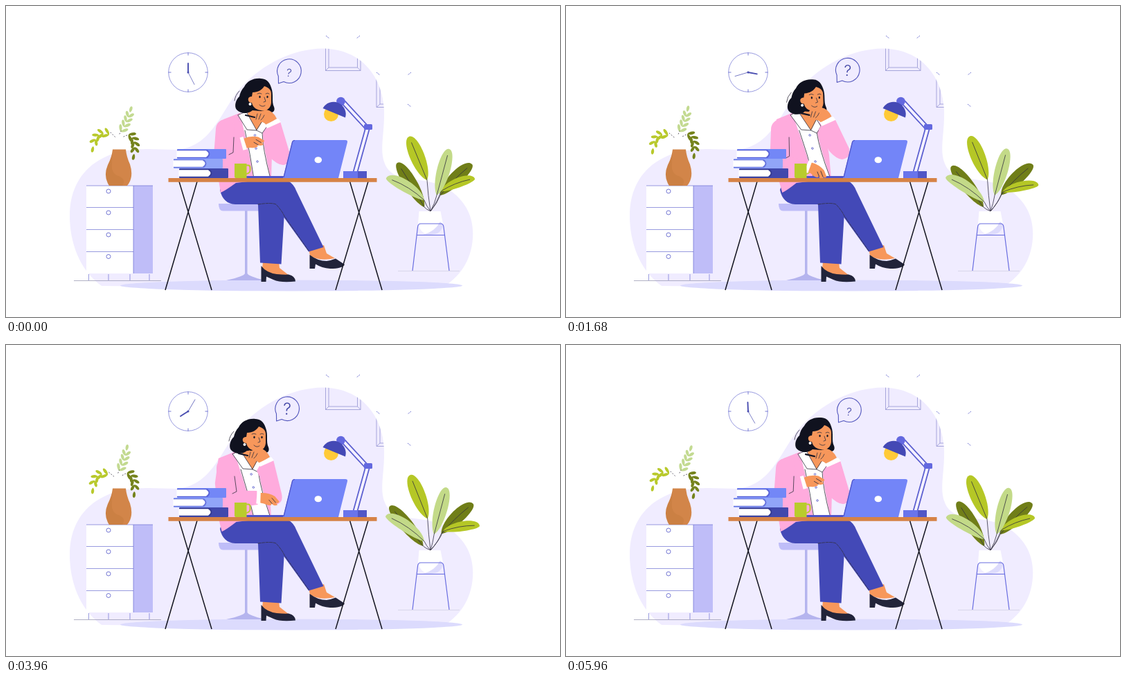
These frames come from a looping animation (800x450 px, 6 s). An HTML page:

```html
<!DOCTYPE html>
<html lang="en">
<head>
<meta charset="utf-8">
<title>Thinking at the desk</title>
<style>
  html, body { margin: 0; width: 100%; height: 100%; overflow: hidden; background: #fff; }
  svg { display: block; width: 100vw; height: 100vh; }
  .thin { fill: none; stroke: #6669cf; stroke-width: .9; }
  .ink { fill: none; stroke: #33303f; stroke-width: .8; stroke-linecap: round; }
  .skin { fill: #f7975b; }
  .pink { fill: #ffabdd; }
  .white { fill: #fff; }
  .pants { fill: #4349b7; }
  .shoe { fill: #22243a; }
  .lilac { fill: #bfbdf8; }
</style>
</head>
<body>
<svg viewBox="0 0 800 450" xmlns="http://www.w3.org/2000/svg">
  <defs>
    <path id="blobShape" d="M138 405C106 382 92 342 92 303C92 264 110 238 133 224C170 201 215 208 248 208C300 202 310 150 341 116C372 83 415 62 457 61.500C512 62 543 100 546 150C547 190 537 212 550 234C568 260 606 242 643 268C667 286 676 310 674 336C672 368 655 394 628 408L412 408Z"/>
    <clipPath id="blobClip"><use href="#blobShape"/></clipPath>
  </defs>

  <use href="#blobShape" fill="#f0ecff"/>
  <ellipse cx="412" cy="404.5" rx="247" ry="8" fill="#dcdbfd"/>

  <!-- wall frames -->
  <g class="thin" clip-path="url(#blobClip)" style="stroke:#9d9ed6">
    <path d="M461.500 42H512V93.500H461.500ZM466 47H507.500V89H466ZM461.500 93.500L466 89M512 93.500L507.500 89"/>
    <path d="M535 95H586V146.500H535ZM540 100H581V142H540ZM535 146.500L540 142"/>
  </g>
  <path class="thin" stroke-dasharray="2 1" d="M462 43l5 4M511 43l-5 4M535 96l5 4M585 96l-5 4M580 142l5 4"/>

  <!-- clock -->
  <circle class="thin" cx="263" cy="96" r="28.300" style="fill:#fff" stroke-opacity=".75"/>
  <path class="thin" d="M263 67.500v4M263 120.500v4M234.500 96h4M287.500 96h4"/>
  <g id="hands" stroke="#494db0" stroke-linecap="round">
    <path d="M263 96V83" stroke-width="1.900"/>
    <path d="M263 96L272 113.500" stroke-width=".7"/>
    <circle cx="263" cy="96" r="1.500" fill="#494db0" stroke="none"/>
  </g>

  <!-- speech bubble -->
  <g id="bubble">
    <path d="M393.300 101.500A17.300 17.300 0 1 1 401 109.500L393.500 112Z" fill="none" stroke="#5256bd" stroke-width="1.100" stroke-linejoin="round"/>
    <g id="question"><text y="5.600" text-anchor="middle" font-family="Inter, 'Open Sans', sans-serif" font-weight="300" font-size="15.500" fill="#4246a6">?</text></g>
  </g>

  <!-- cabinet -->
  <path class="white" d="M116 260H184V387H116Z"/>
  <path class="lilac" d="M184 260H212V387H184Z"/>
  <path class="thin" d="M116 260H212M116 291.500H184M116 323.500H184M116 355.500H184M184 260V387M119.500 388v9M148 388v9M179 388v9M207 388v9" opacity=".75"/>
  <g id="knobs" class="thin"></g>
  <path d="M98 397.500H224" stroke="#9c9cb4" stroke-width=".8"/>

  <!-- vase and sprigs -->
  <g id="sprigs"></g>
  <path d="M154 207.500H173Q174 218 179 229Q185 248 175 260H149Q140 246 147 230Q153 218 154 207.500Z" fill="#d28549"/>
  <path d="M154 210Q153 219 147 230Q140 246 149 260H168Q175 250 160 245Q151 240 153 227Z" fill="#b87335" opacity=".3"/>

  <!-- plant -->
  <g id="plant"></g>
  <path class="white" d="M596.500 297H627.500L631 315Q629 331 613 331Q599 331 595 315Z"/>
  <path d="M627 312L631 316Q629 331 613 331H602Q619 327 627 312Z" fill="#dddbfc"/>
  <path d="M587 383L594.500 320Q595 315 599 315H628Q631.500 315 632 320L640 383M593 331.500H634" fill="none" stroke="#686ce0" stroke-width="1.200"/>
  <path d="M566 383.500H655" stroke="#d3d2e4" stroke-width=".8"/>

  <!-- stool -->
  <path d="M345 296H348.500V387Q350 391 374 397H318Q344 391 345 387Z" fill="#b5b4ee"/>
  <path class="lilac" d="M307 286H365V296.500H313Q307 296 307 286Z"/>

  <!-- legs -->
  <path class="skin" d="M371 370H394L395 379L409 390Q388 395 370 380ZM437 352L459 346L463 358L475 365Q452 370 439 361Z"/>
  <path class="shoe" d="M368.500 376Q376 386 391 388Q402 389 408 388.500Q418 391 418 398.500Q397 401 386 396L376 391.500L375.500 399H368.500ZM438.500 360Q450 369 463 369Q470 368 476 365.500L489 374Q486 380 468 380Q456 379 447 373.500L446 380H438.500Z"/>
  <path class="pants" d="M310 263L336 252H405Q415 256 419 267L458.500 349L437 355.500L401.500 306L397.500 373.500L367 371.500L364 287H331Q313 286 309 266Z"/>
  <path class="ink" d="M364 287Q383 284 390 287Q399 297 402 304L437 354" stroke-dasharray="4 1.500"/>

  <!-- torso -->
  <g id="torso">
    <path class="pink" d="M337 155L314 164L306 200L307 252L310 270Q317 267 332 256L383 250L384 215L381 172L366 163Z"/>
    <path class="white" d="M338 156L371 164Q369 185 375 215L382 250H357.500Q352 216 346 190Z"/>
    <path class="ink" d="M345 180Q353 215 357.500 247M370 184Q371 208 381 246" stroke-width=".5"/>
    <path class="skin" d="M350 148H373V166L362 180L349 160Z"/>
    <path class="ink" d="M347 153L362 180L348 179L335 158ZM372 164L377 174L370 184L362 180Z" style="fill:#fff"/>
    <circle class="thin" cx="359.500" cy="187" r="1.300"/>
    <circle class="thin" cx="361" cy="206" r="1.300"/>
    <circle class="thin" cx="363" cy="225" r="1.300"/>
  </g>
  <path id="raisedArm" class="pink"/>

  <!-- head -->
  <g id="head">
    <path d="M368 105C357 104 348 109 344 117C340 121 338 126 337 131C332 135 329 145 333 150C339 156 349 157 356 151L379 153C386 156 389 151 387 146C383 138 387 128 383 118C380 108 374 105 368 105Z" fill="#10121f"/>
    <path class="ink" d="M337 123Q331 129 330 137"/>
    <path class="skin" d="M356 125C364 125 370 121 373 116C379 118 383 121 383 127V140C382 149 375 153 368 151C360 150 356 145 355 140C348 140 348 130 355 131Z"/>
    <path class="ink" d="M363 127q3-2 6 0M375 127q3-2 5 0M373 132l2 6l-3 1M366 143q4 4 8 1"/>
    <g id="eyes" fill="#191a28"><ellipse cx="366.500" cy="131.500" rx="1.200" ry="1.700"/><ellipse cx="377.500" cy="131.500" rx="1.200" ry="1.700"/></g>
    <circle class="white" cx="352.500" cy="142" r="2"/>
  </g>
  <g id="chinHand">
    <path class="skin" d="M357 159Q359 152 364 154L376 150Q386 152 391 163L376 172Q371 167 367 168L360 168Q356 164 357 159Z"/>
    <path class="ink" d="M363 156l-2 8M368 156l-3 8M373 158q-2 5-5 7" stroke-width=".5"/>
    <path d="M346 158L359 161" stroke="#171827" stroke-width="2.200" stroke-linecap="round"/>
    <path class="white" d="M374 172L393 163L397 168L377 177Z"/>
  </g>

  <!-- desk -->
  <path d="M276 254L230 411M250 254L297 411M496.500 254L543 411M523 254L476 411" stroke="#14151f" stroke-width="1.500"/>
  <path d="M346 246H404V249.500H346Z" fill="#4e53c9"/>
  <path id="sleeve" class="pink"/>
  <path id="fold" class="ink"/>
  <path d="M346 230.500H350Q352.500 230.500 352.500 234V238Q352 242.500 346 243" fill="none" stroke="#b9cc2c" stroke-width="2"/>
  <g id="typingHand">
    <path class="skin" d="M0-7Q12-9 22-4L29 3Q28 7 24 5L27 8Q23 11 18 7L18 9Q14 11 7 8L0 7Z"/>
    <path class="ink" d="M18-1l6 6M14 2l5 5" stroke-width=".5"/>
    <path class="white" d="M-4-10H1L2 9H-4Z"/>
  </g>
  <path d="M417 194H490Q493.500 194 493 197L480 249H400L413 197Q414 194 417 194Z" fill="#7385f8"/>
  <path d="M401 248L413.500 197Q414 194.500 417 194.500" fill="none" stroke="#4e53c9" stroke-width="1.200"/>
  <ellipse class="white" cx="450.800" cy="222.700" rx="5.300" ry="4.500"/>
  <g id="books"></g>
  <path d="M330 228H347.500V249H332Q330 249 330 247Z" fill="#b9cc2c"/>
  <path d="M234.500 249H535.500V254.800H234.500Z" fill="#d68246"/>

  <!-- lamp -->
  <g id="lampArm" fill="none">
    <path d="M504.500 240L522 177L487 139" stroke="#5a5ed0" stroke-width="7.500"/>
    <path d="M504.500 240L522 177L487 139" stroke="#f4f1ff" stroke-width="4"/>
  </g>
  <path d="M487 239H521V249H487Z" fill="#6974ec"/>
  <path d="M508 239H521V249H508Z" fill="#5156c6"/>
  <rect x="517" y="171" width="12" height="8" rx="1.500" fill="#6368df"/>
  <circle cx="483.500" cy="138" r="6.300" fill="#6368df"/>
  <circle cx="469.500" cy="156.500" r="10.500" fill="#ffca38"/>
  <path d="M457.500 148A17.700 17.700 0 0 1 490 161.500Z" fill="#4449b5"/>
</svg>

<script>
const LOOP = 6000, STEP = 40;
const $ = id => document.getElementById(id);
const set = (id, name, value) => $(id).setAttribute(name, value);
const mix = (a, b, k) => a + (b - a) * k;

// Poses of the sitter, joined by a smooth periodic curve.
const times = [0, 1080, 2320, 3160, 3960, 5000];
const pose = {
  headX: [0, -8, -13, -10, -8, -5],
  headY: [0, 1, 1.5, 1.5, 2, 1.5],
  headTurn: [0, -1, -2, -2, 0, 1],
  shoulderX: [317, 312, 309, 311, 318, 318],
  elbowX: [313, 309, 307, 309, 318, 318],
  elbowY: [224, 229, 229, 229, 224, 224],
  wristX: [344, 351, 350, 351, 366, 363],
  wristY: [199, 230, 231, 231, 221, 221],
  wristTurn: [-15, 22, 20, 20, 5, 30],
  cuffX: [0, -5, -10, -13, -10, -6],
  cuffY: [0, -2, -4, -3, -1, 1],
  raisedX: [411, 411, 407, 399, 399, 403],
  raisedY: [220, 214, 211, 216, 221, 214]
};

function key(i) {
  const n = times.length, wrap = Math.floor(i / n);
  return { i: i - wrap * n, time: times[i - wrap * n] + wrap * LOOP };
}

function sample(values, t) {
  let i = times.length - 1;
  while (times[i] > t) i--;
  const [a, b, c, d] = [i - 1, i, i + 1, i + 2].map(j => {
    const k = key(j);
    return { t: k.time, v: values[k.i] };
  });
  const span = c.t - b.t, u = (t - b.t) / span;
  const m0 = (c.v - a.v) / (c.t - a.t) * span;
  const m1 = (d.v - b.v) / (d.t - b.t) * span;
  return b.v + u * (m0 + u * (3 * (c.v - b.v) - 2 * m0 - m1 + u * (2 * (b.v - c.v) + m0 + m1)));
}

// Point along a base-to-tip line, moved sideways by off pixels.
function beside(x0, y0, x1, y1, along, off) {
  const dx = x1 - x0, dy = y1 - y0, k = off / Math.hypot(dx, dy);
  return `${(x0 + dx * along - dy * k).toFixed(2)} ${(y0 + dy * along + dx * k).toFixed(2)}`;
}

function leaf(x0, y0, x1, y1, width, bend = 0) {
  const at = (along, side) => beside(x0, y0, x1, y1, along, side * width / 1.5 + bend / .75);
  return `M${x0} ${y0}C${at(.2, 1)} ${at(1, 1)} ${x1} ${y1}C${at(1, -1)} ${at(.2, -1)} ${x0} ${y0}Z`;
}

function limb(x0, y0, x1, y1, r0, r1) {
  const len = Math.hypot(x1 - x0, y1 - y0), nx = -(y1 - y0) / len, ny = (x1 - x0) / len;
  return `M${x0 + nx * r0} ${y0 + ny * r0}A${r0} ${r0} 0 0 1 ${x0 - nx * r0} ${y0 - ny * r0}` +
    `L${x1 - nx * r1} ${y1 - ny * r1}L${x1 + nx * r1} ${y1 + ny * r1}Z`;
}

// Sprig: pairs of small leaves along a quadratic curve.
function sprig([ax, ay, bx, by, cx, cy], color) {
  let d = '';
  const count = 4;
  for (let i = 0; i <= count; i++) {
    const u = i / count, v = 1 - u;
    const x = v * v * ax + 2 * u * v * bx + u * u * cx;
    const y = v * v * ay + 2 * u * v * by + u * u * cy;
    const dir = Math.atan2(v * (by - ay) + u * (cy - by), v * (bx - ax) + u * (cx - bx));
    for (const side of i < count ? [-.65, .65] : [0]) {
      const size = 11 - 2 * u;
      d += leaf(x, y, x + size * Math.cos(dir + side), y + size * Math.sin(dir + side), 4.2);
    }
  }
  return `<path d="${d}" fill="${color}"/>`;
}

$('sprigs').innerHTML =
  sprig([149, 186, 131, 179, 126, 203], '#b8c92c') +
  sprig([166, 182, 175, 168, 179, 154], '#c3da91') +
  sprig([177, 186, 189, 193, 185, 214], '#75831c') +
  '<path class="ink" stroke-dasharray="1 3" d="M151 183L158 190M164 185l2-4M170 189l7-3"/>';

$('knobs').innerHTML = [268, 299, 331, 362.5].map(y => `<circle cx="148" cy="${y}" r="3"/>`).join('');

$('books').innerHTML = [[247, 207, '#7387f7', '#5963d8'], [242, 221, '#91a5f8', '#6875de'], [250, 235, '#4148ac', '#353b93']]
  .map(([x, y, cover, edge]) =>
    `<rect x="${x}" y="${y}" width="71" height="14" rx="1" fill="${cover}"/>
     <path d="M${x} ${y + 1}H${x + 44}Q${x + 51} ${y + 7} ${x + 44} ${y + 13}H${x}" fill="${edge}"/>
     <path d="M${x - .5} ${y + 2.2}H${x + 42}Q${x + 49} ${y + 7} ${x + 42} ${y + 11.8}H${x - .5}Z" fill="#fff"/>`).join('');

// Plant leaves: base and tip at both ends of the sway, width, sideways bend, color.
const leaves = [
  { from: [604, 291, 565, 227], to: [602, 291, 551, 235], width: 19, bend: 1, color: '#707e18' },
  { from: [627, 274, 673, 229], to: [629, 273, 675, 230], width: 19, bend: -2, color: '#707e18' },
  { from: [604, 281, 549, 249], to: [604, 285, 548, 247], width: 17, bend: 4, color: '#c3da88' },
  { from: [608, 252, 582, 189], to: [609, 251, 584, 188], width: 21, bend: 0, color: '#b5c726' },
  { from: [628, 268, 677, 250], to: [632, 270, 686, 265], width: 14, bend: -3, color: '#b5c726' },
  { from: [622, 274, 640, 207], to: [617, 274, 635, 206], width: 19, bend: 0, color: '#c3da88' }
];
$('plant').innerHTML = leaves.map(l =>
  `<path fill="${l.color}"/><path class="ink" stroke-width=".7"/>`).join('');

function drawPlant(sway) {
  const shapes = $('plant').children;
  leaves.forEach((l, i) => {
    const ends = l.from.map((v, j) => mix(v, l.to[j], sway));
    const [x0, y0] = ends;
    shapes[2 * i].setAttribute('d', leaf(...ends, l.width, l.bend));
    shapes[2 * i + 1].setAttribute('d',
      `M613 297Q${mix(613, x0, .7)} ${mix(297, y0, .5)} ${x0} ${y0}` +
      `Q${beside(...ends, .45, l.bend * 1.6)} ${beside(...ends, .86, l.bend * .5)}`);
  });
}

function drawSitter(t) {
  const p = {};
  for (const name in pose) p[name] = sample(pose[name], t);

  const lean = p.headX / 95;
  set('torso', 'transform', `matrix(1 0 ${-lean} 1 ${lean * 250} 0)`);
  set('head', 'transform', `translate(${p.headX} ${p.headY}) rotate(${p.headTurn} 365 150)`);
  set('chinHand', 'transform', `translate(${p.cuffX} ${p.cuffY})`);

  const { raisedX: rx, raisedY: ry, cuffX: cx, cuffY: cy } = p;
  set('raisedArm', 'd', `M${376 + cx} ${176 + cy}L${396 + cx} ${167 + cy}L${rx - 1} ${ry - 6}` +
    `Q${rx + 2} ${ry + 8} ${rx - 10} ${ry + 10}Q${rx - 18} ${ry + 11} 380 ${ry - 2}L${372 + cx} ${183 + cy}Z`);

  const { shoulderX: sx, elbowX: ex, elbowY: ey, wristX: wx, wristY: wy } = p;
  set('sleeve', 'd', limb(sx, 178, ex, ey, 14, 13.5) + limb(ex, ey, wx - 3, wy, 13.5, 10));
  set('fold', 'd', `M${sx + 12} 190L${ex + 15} ${ey - 12}L${ex + 9} ${ey - 9}`);
  set('typingHand', 'transform', `translate(${wx} ${wy}) rotate(${p.wristTurn})`);

  const blink = Math.abs(t - 5000) < 100 ? .25 : 1;
  set('eyes', 'transform', `translate(0 ${131.5 * (1 - blink)}) scale(1 ${blink})`);
}

function draw(t) {
  const sway = (1 - Math.cos(2 * Math.PI * t / LOOP)) / 2;
  set('hands', 'transform', `rotate(${360 * t / LOOP} 263 96)`);
  set('bubble', 'transform', `translate(${-3.7 * sway} ${-2.5 * sway})`);
  set('question', 'transform',
    `translate(408.7 ${mix(96.5, 93.5, sway)}) rotate(${mix(8, 0, sway)}) scale(${mix(1, 1.68, sway)})`);
  set('sprigs', 'transform', `rotate(${-7 * sway} 164 208)`);
  drawPlant(sway);
  drawSitter(t);
}

const start = performance.now();
function tick() {
  const t = (performance.now() - start) % LOOP;
  draw(Math.floor(t / STEP) * STEP);
  requestAnimationFrame(tick);
}
tick();
</script>
</body>
</html>
```
